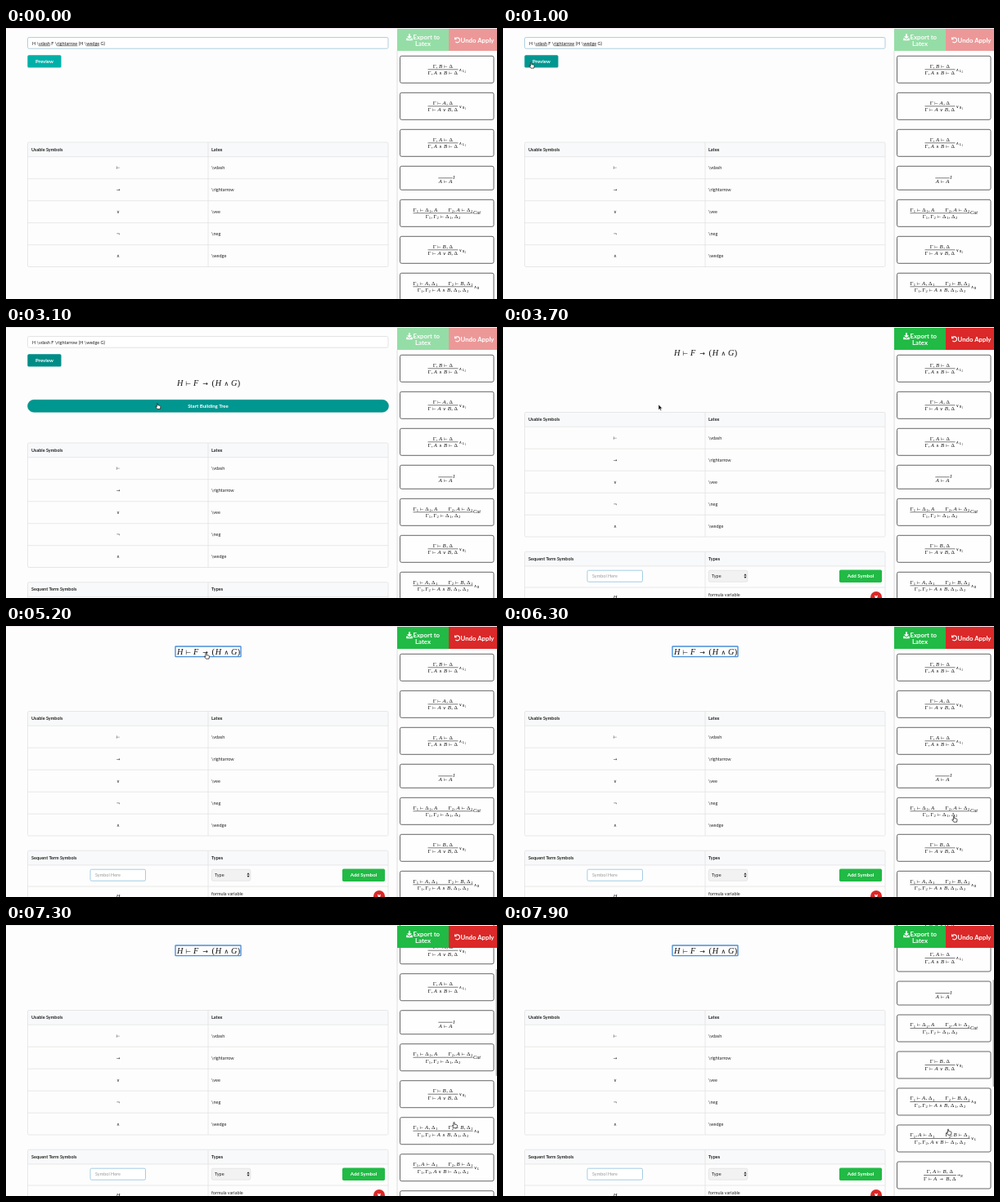
An HTML page for the animation above (8 s loop, 600 by 332 pixels).

```html
<!DOCTYPE html>
<html lang="en">
<head>
<meta charset="utf-8">
<title>Sequent proof builder</title>
<style>
html, body { margin: 0; width: 100%; height: 100%; overflow: hidden; background: #fdfdfd; }
svg { display: block; width: 600px; height: 332px; font: 5.5px Lato, sans-serif; fill: #222; }
.b { font-weight: 700; }
.w { font-weight: 700; fill: #fff; }
.m { text-anchor: middle; }
.math { font-family: "Liberation Serif", serif; text-anchor: middle; fill: #111; }
.i { font-style: italic; }
.op { font-family: "DejaVu Sans", sans-serif; }
.line { stroke: #e2e3e4; stroke-width: .8; fill: none; }
.card { fill: #fefefe; stroke: #555; stroke-width: .9; }
</style>
</head>
<body>
<svg id="stage" viewBox="0 0 600 332"></svg>
<script>
const LOOP = 8000, PREVIEW = 1500, START = 3700, SELECT = 4900;

const rect = (x, y, w, h, r, attrs) => `<rect x="${x}" y="${y}" width="${w}" height="${h}" rx="${r}" ${attrs}/>`;
const text = (x, y, s, cls = '', attrs = '') => `<text x="${x}" y="${y}" class="${cls}" ${attrs}>${s}</text>`;
const path = (d, attrs) => `<path d="${d}" ${attrs}/>`;

// Advance of each math symbol in em, with the space around operators
const ADVANCE = {
  'Γ': .625, 'Δ': .833, A: .75, B: .759, H: .89, F: .75, G: .786, ',': .445,
  '(': .389, ')': .389, '⊢': 1.17, '→': 1.56, '∧': 1.11, '∨': 1.11, ' ': 2
};
const advance = c => ADVANCE[c] || .4;
const mathWidth = (s, size) => [...s].reduce((w, c) => w + advance(c), 0) * size;

function math(s, x, y, size) {
  return [...s].map(c => {
    const w = advance(c) * size, sub = /\d/.test(c), op = /[⊢→∧∨]/.test(c);
    const cls = 'math ' + (op ? 'op' : /[A-Z]/.test(c) ? 'i' : '');
    const cx = x + (c === ',' ? .14 * size : w / 2);
    const scale = sub ? .7 : op ? .8 : 1.04;
    x += w;
    return c === ' ' ? '' : text(cx.toFixed(2), y + (sub ? .16 * size : 0), c, cls, `font-size="${(size * scale).toFixed(2)}"`);
  }).join('');
}

function ruleLabel(s, x, y) {
  if (/^[A-Z]/.test(s)) return text(x, y + 1.6, s, 'math i', 'font-size="6.2" style="text-anchor:start"');
  const at = (c, dx, dy, size, cls) => text(x + dx, y + dy, c, 'math ' + cls, `font-size="${size}"`);
  return at(s[0], 2.4, 2, 5, 'op') + at(s[1], 6, 3, 4, 'i') + (s[2] ? at(s[2], 8.2, 3.7, 3, '') : '');
}

function rule(y, h, top, bottom, label) {
  const size = 6.5, mid = y + h / 2;
  const wTop = mathWidth(top, size), wBottom = mathWidth(bottom, size), w = Math.max(wTop, wBottom);
  const labelWidth = label === 'I' ? 3 : 9;
  const x = 538.5 - (w + labelWidth) / 2;
  return rect(481.5, y, 114.5, h, 2, 'class="card"') +
    math(top, x + (w - wTop) / 2, mid - 2, size) +
    math(bottom, x + (w - wBottom) / 2, mid + 6.3, size) +
    path(`M${x} ${mid}h${w}`, 'stroke="#222" stroke-width=".6"') +
    ruleLabel(label, x + w + .5, mid);
}

const RULES = [
  ['Γ,B⊢Δ', 'Γ,A∧B⊢Δ', '∧L2'],
  ['Γ⊢A,Δ', 'Γ⊢A∨B,Δ', '∨R1'],
  ['Γ,A⊢Δ', 'Γ,A∧B⊢Δ', '∧L1'],
  ['', 'A⊢A', 'I'],
  ['Γ1⊢Δ1,A Γ2,A⊢Δ2', 'Γ1,Γ2⊢Δ1,Δ2', 'Cut'],
  ['Γ⊢B,Δ', 'Γ⊢A∨B,Δ', '∨R2'],
  ['Γ1⊢A,Δ1 Γ2⊢B,Δ2', 'Γ1,Γ2⊢A∧B,Δ1,Δ2', '∧R'],
  ['Γ1,A⊢Δ1 Γ2,B⊢Δ2', 'Γ1,Γ2,A∨B⊢Δ1,Δ2', '∨L'],
  ['Γ,A⊢B,Δ', 'Γ⊢A→B,Δ', '→R']
];

function ruleCards() {
  let y = 34.3;
  return RULES.map(r => {
    const h = r[0] ? 33 : 29, card = rule(y, h, ...r);
    y += h + 12;
    return card;
  }).join('');
}

const SYMBOLS = [['⊢', 'vdash'], ['→', 'rightarrow'], ['∨', 'vee'], ['¬', 'neg'], ['∧', 'wedge']];

const tableHead = (y, a, b) =>
  rect(26.5, y, 440.5, 17.7, 1, 'fill="#f8f9fa"') +
  path(`M26.5 ${y + 17.7}h440.5`, 'class="line"') +
  text(31, y + 10.7, a, 'b') + text(251, y + 10.7, b, 'b');

// Tables and heading, measured from the top of the first table
function page() {
  const rows = SYMBOLS.map(([sign, name], i) => {
    const y = 17.7 + 27 * i;
    return (i ? path(`M26.5 ${y}h440.5`, 'class="line"') : '') +
      text(137, y + 15.4, sign, 'op m') + text(251, y + 15.4, '\\' + name);
  }).join('');
  const heading = 'H⊢F→(H∧G)';
  return tableHead(0, 'Usable Symbols', 'Latex') + rows +
    rect(26.5, 0, 440.5, 152.5, 1.5, 'class="line"') + path('M247 0v152.5', 'class="line"') +
    `<g id="built">` +
    math(heading, 247.3 - mathWidth(heading, 9.85) / 2, -70, 9.85) +
    tableHead(170.7, 'Sequent Term Symbols', 'Types') +
    rect(26.5, 170.7, 440.5, 90, 1.5, 'class="line"') +
    path('M247 170.7v90M26.5 214.5h440.5', 'class="line"') +
    rect(103, 193.7, 67.5, 14, 1.5, 'fill="#fff" stroke="#8fc1dd" stroke-width=".8"') +
    text(109, 202.8, 'Symbol Here', '', 'fill="#999"') +
    rect(251.3, 193.7, 47.5, 14, 2, 'fill="#f2f2f2" stroke="#ddd" stroke-width=".7"') +
    text(255, 202.8, 'Type') +
    path('M294.4 200l1.6-2.3 1.6 2.3zM294.4 201.3l1.6 2.3 1.6-2.3z', 'fill="#222"') +
    rect(411, 193, 52, 15.5, 1.7, 'fill="#21ba45"') + text(437, 202.8, 'Add Symbol', 'w m', 'font-size="6.1"') +
    text(137, 228.3, 'H', 'math i', 'font-size="6.5"') + text(251, 225.3, 'formula variable') +
    `<circle cx="456" cy="226.5" r="7" fill="#db2828"/>` +
    path('M454.3 224.8l3.4 3.4m0-3.4l-3.4 3.4', 'stroke="#fff" stroke-width="1.3"') + `</g>`;
}

const typed = 'H \\vdash F \\rightarrow (H \\wedge G)';
const checked = typed.replace(/\\(\w+)/g, '\\<tspan class="word">$1</tspan>');

stage.innerHTML =
  rect(0, 0, 600, 332, 0, 'fill="#fdfdfd"') + rect(0, 0, 600, 1, 0, 'fill="#f4ebf1"') +
  `<g id="form">` +
  rect(26.5, 11.5, 440.5, 13.7, 1.7, 'id="field" fill="#fff" stroke-width=".8"') + text(32, 20.6, checked) +
  rect(26.3, 33.3, 41.2, 15.3, 1.7, 'id="preview"') + text(47, 43.2, 'Preview', 'w m', 'font-size="6.1"') + `</g>` +
  `<g id="page">${page()}</g>` +
  `<g id="launch">` + rect(26.5, 89.3, 441, 15, 7.5, 'id="start" stroke="#088a84" stroke-width=".6"') +
  text(247, 98.8, 'Start Building Tree', 'w m', 'font-size="6.1"') + `</g>` +
  rect(207, 25, 80, 12.6, .5, 'id="ring" fill="none" stroke="#4b8fd9" stroke-width="1.4"') +
  rect(478, 1, 122, 331, 0, 'fill="#fdfdfd"') + path('M478 28v304', 'stroke="#d6d6d6" stroke-width=".8"') +
  `<g id="cards">${ruleCards()}</g>` +
  rect(598.6, 30, 1.4, 131, .7, 'id="thumb" fill="#aaa"') +
  rect(478, 1, 122, 27, 0, 'fill="#fdfdfd"') +
  `<g id="tools">` + rect(478, 1, 63, 27, 0, 'fill="#21ba45"') + rect(541, 1, 59, 27, 0, 'fill="#db2828"') +
  path('M492 7.2h2v3h2l-3 3.2-3-3.2h2zM489.2 12.6h1.6l1.4 1.4h1.6l1.4-1.4h1.6v2.6h-7.6z', 'fill="#fff"') +
  text(513.8, 13.8, 'Export to', 'w m', 'font-size="7.8"') + text(509.5, 22, 'Latex', 'w m', 'font-size="7.8"') +
  path('M549 13.2a3 3 0 1 1 .3 3.7', 'fill="none" stroke="#fff" stroke-width="1.1"') +
  path('M548 11v3.3h3.3z', 'fill="#fff"') +
  text(576, 17.6, 'Undo Apply', 'w m', 'font-size="7.8"') + `</g>` +
  `<g id="cursor" stroke-linejoin="round">` +
  path('M0 0v6.6l1.6-1.4 1 2.3 1.1-.5-1-2.2h2.1z', 'id="arrow" fill="#111" stroke="#fff" stroke-width=".5"') +
  path('M-.6 .4q.6-.9 1.2 0v2.2l2.6.5q.9.3.8 1.3l-.5 2.8h-3.6l-2-2.6q-.2-1 .7-.6l.8.7z',
    'id="hand" fill="#fff" stroke="#111" stroke-width=".7"') + `</g>`;

const $ = id => document.getElementById(id);
const set = (id, name, value) => $(id).setAttribute(name, value);
const show = (id, on) => set(id, 'visibility', on ? 'visible' : 'hidden');
const move = (id, x, y) => set(id, 'transform', `translate(${x} ${y})`);

// Eased value between keys of the form [time, value, value...]
function at(keys, t) {
  const n = keys.findIndex(k => k[0] > t);
  if (n < 0) return keys[keys.length - 1].slice(1);
  if (!n) return keys[0].slice(1);
  const a = keys[n - 1], b = keys[n], u = (t - a[0]) / (b[0] - a[0]), e = u * u * (3 - 2 * u);
  return a.slice(1).map((v, i) => v + (b[i + 1] - v) * e);
}

const POINTER = [
  [300, 130, 240], [900, 34, 42], [1100, 34.5, 42], [1500, 39, 42], [2300, 39.5, 42.5],
  [3200, 190, 95], [3900, 190, 95], [4500, 244.5, 33], [5500, 244.5, 33],
  [6300, 551, 233], [6900, 551, 233], [7700, 544, 250]
];
const SCROLL = [[6550, 0], [6800, 14.3], [7700, 100.3]];

function draw(t) {
  const previewed = t >= PREVIEW, building = t >= START;
  const [x, y] = at(POINTER, t), [scroll] = at(SCROLL, t);
  const over = (l, top, r, bottom) => x >= l && x <= r && y >= top && y <= bottom;
  const onPreview = !building && over(26, 33, 68, 49);
  const onStart = previewed && !building && over(26, 89, 468, 105);
  const onHeading = building && over(206, 24, 288, 38);

  show('form', !building);
  show('launch', previewed && !building);
  show('built', previewed);
  show('ring', t >= SELECT);
  move('page', 0, building ? 104.5 : previewed ? 142 : 140);
  set('field', 'stroke', previewed ? '#dcdddd' : '#9cc5d6');
  document.querySelectorAll('.word').forEach(w => w.setAttribute('text-decoration', previewed ? 'none' : 'underline'));
  set('preview', 'fill', previewed ? '#008c86' : onPreview ? '#009790' : '#00b0a8');
  set('start', 'fill', onStart ? '#009790' : '#00aca4');
  set('tools', 'opacity', building ? 1 : .47);

  move('cards', 0, -scroll);
  show('thumb', scroll > 0);
  move('thumb', 0, scroll * .37);

  const pointing = onPreview || onStart || onHeading || over(481, 30, 597, 332);
  move('cursor', x, y);
  show('arrow', t >= 300 && !pointing);
  show('hand', t >= 300 && pointing);
}

function tick() {
  draw(performance.now() % LOOP);
  requestAnimationFrame(tick);
}
tick();
</script>
</body>
</html>
```
